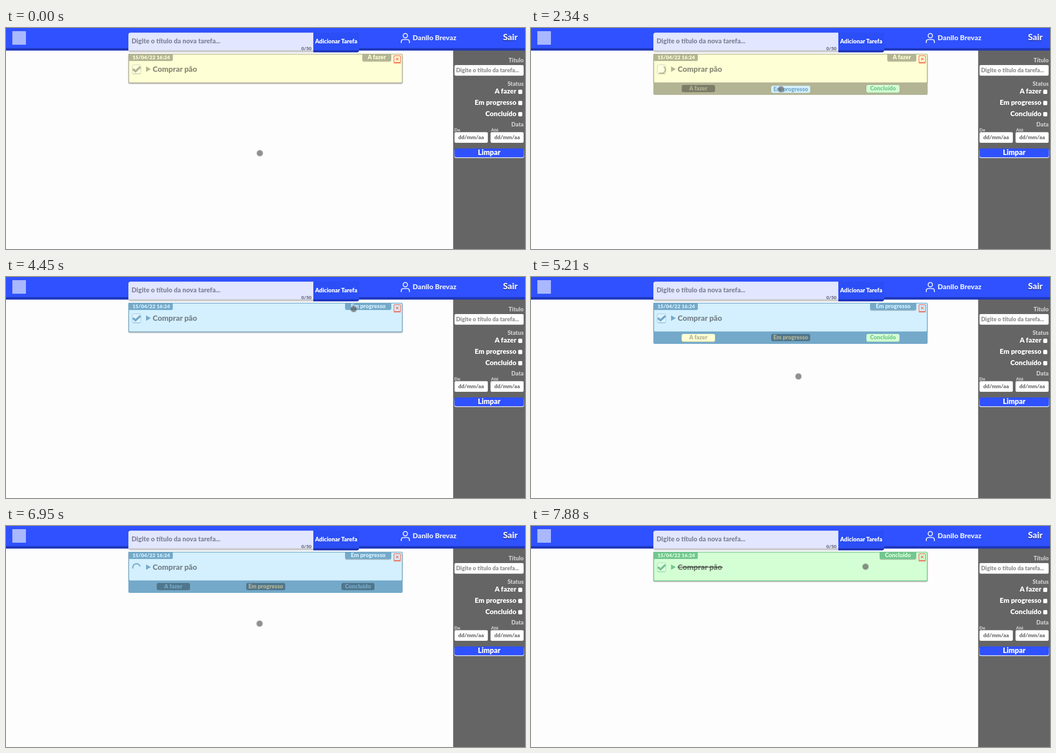
An HTML page that plays this animation: 1145 px wide and 489 px high, repeating every 8 s.

```html
<!DOCTYPE html>
<html lang="pt-BR">
<head>
<meta charset="utf-8">
<title>Lista de tarefas</title>
<style>
  :root {
    --yellow: #feffd4; --olive: #b2b494;
    --sky: #d4f0ff; --steel: #74a9c9;
    --mint: #d4ffd4; --leaf: #74c690;
    --dark: rgba(0, 0, 0, .3);
    --blue: #2f51ff; --navy: #2038bc;
  }
  html, body { margin: 0; width: 100%; height: 100%; overflow: hidden; background: #fdfdfd; }
  svg { display: block; width: 100vw; height: 100vh; }
  text { font: 900 12.6px Lato, "Open Sans", sans-serif; }
  .mid { text-anchor: middle; }
  .end { text-anchor: end; }
  .tiny { font-size: 10.2px; }
  .date { font-size: 11.9px; }
  .option { font-size: 15.1px; }

  .task, .drawer, .row, .btn, .badge, .lift, .box, .tick, .spinner, .strike, .title, .cursor {
    animation: 8s step-end infinite;
  }

  /* Card colours */
  .task { animation-name: theme; }
  .accent { fill: var(--accent); }
  .paper { fill: var(--bg); }
  .shadow { filter: blur(1.2px); opacity: .35; }
  @keyframes theme {
    0% { --accent: var(--olive); --tab: var(--olive); --bg: var(--yellow); }
    45.25% { --accent: var(--steel); --tab: var(--steel); --bg: var(--sky); }
    88.375% { --accent: #75b6a8; --tab: var(--leaf); --bg: #d4f6e5; }
    89.875%, 100% { --accent: var(--leaf); --tab: var(--leaf); --bg: var(--mint); }
  }

  /* Status drawer */
  .drawer { animation-name: drawer; }
  .row { animation-name: row; }
  @keyframes drawer {
    0%, 45.25%, 89.875%, 100% { clip-path: inset(0 0 33px 0); }
    16%, 58.625% { clip-path: inset(0 0 8px 0 round 3px); }
    17.625%, 60.25% { clip-path: inset(0 0 0 0 round 3px); }
    88.375% { clip-path: inset(0 0 19.5px 0 round 3px); }
  }
  @keyframes row {
    0%, 45.25%, 88.375%, 100% { transform: translateY(-2px); }
    17.625%, 60.25% { transform: none; }
  }
  .edge { fill: var(--edge); }
  .face { fill: var(--face); }
  .btn text { fill: var(--ink); }
  .todo { animation-name: todo; }
  .doing { animation-name: doing; }
  .done { animation-name: done; }
  @keyframes todo {
    0%, 82.25%, 100% { --face: var(--dark); --ink: var(--accent); --edge: transparent; }
    45.25% { --face: var(--yellow); --ink: var(--olive); --edge: #ece6a8; }
    88.375% { --face: #a9bea4; --ink: var(--accent); --edge: transparent; }
  }
  @keyframes doing {
    0% { --face: var(--sky); --ink: var(--steel); --edge: #b4dcf0; transform: none; }
    27.75% { --face: var(--sky); --ink: var(--steel); --edge: transparent; transform: translateY(1.5px); }
    31.125% { --face: var(--dark); --ink: var(--accent); --edge: transparent; transform: none; }
    88.375%, 100% { --face: #8fbfba; --ink: var(--accent); --edge: transparent; transform: none; }
  }
  @keyframes done {
    0%, 45.25% { --face: var(--mint); --ink: var(--leaf); --edge: #aee8b4; transform: none; }
    33%, 82.25%, 100% { --face: var(--dark); --ink: var(--accent); --edge: transparent; transform: none; }
    74.625% { --face: var(--mint); --ink: var(--leaf); --edge: transparent; transform: translateY(1.5px); }
  }

  /* Status badge */
  .badge text { fill: var(--bg); }
  .is-todo { animation-name: is-todo; }
  .is-doing { animation-name: is-doing; }
  .is-done { animation-name: is-done; }
  .lift { animation-name: lift; }
  @keyframes is-todo { 0% { opacity: 1; } 45.25%, 100% { opacity: 0; } }
  @keyframes is-doing { 0%, 88.375%, 100% { opacity: 0; } 45.25% { opacity: 1; } }
  @keyframes is-done { 0% { opacity: 0; } 88.375%, 100% { opacity: 1; } }
  @keyframes lift { 0%, 65.125%, 100% { opacity: .2; } 55.625% { opacity: 0; } }

  /* Checkbox and spinner */
  .box { animation-name: box; }
  .tick { animation-name: tick; }
  .spinner { animation-name: busy; }
  .arc { transform-origin: 288px 92px; animation: turn 1s -.51s linear infinite; }
  @keyframes box { 0%, 45.25%, 88.375%, 100% { opacity: 1; } 31.125%, 82.25% { opacity: 0; } }
  @keyframes tick { 0%, 45.25%, 88.375%, 100% { opacity: 1; } 29.25%, 80.75% { opacity: 0; } }
  @keyframes busy { 0%, 45.25%, 88.375%, 100% { opacity: 0; } 29.25%, 80.75% { opacity: 1; } }
  @keyframes turn { to { transform: rotate(360deg); } }

  .title { animation-name: title; }
  .strike { animation-name: strike; }
  @keyframes title { 0% { opacity: .5; } 88.375%, 100% { opacity: .58; } }
  @keyframes strike { 0% { opacity: 0; } 88.375%, 100% { opacity: .7; } }

  /* Pointer */
  .cursor { animation-name: pointer; }
  @keyframes pointer {
    0% { transform: translate(560px, 277px); }
    3.125% { transform: translate(525px, 240px); }
    4.625% { transform: translate(390px, 140px); }
    6.125% { transform: translate(305.5px, 86.5px); }
    8% { transform: translate(301.5px, 84.5px); }
    9.875% { transform: translate(288.5px, 89.5px); }
    19.125% { transform: translate(315px, 118px); }
    20.625% { transform: translate(408.5px, 165.5px); }
    22.375% { transform: translate(535.5px, 177.5px); }
    24.125% { transform: translate(549.5px, 143.5px); }
    25.875% { transform: translate(551.5px, 135.5px); }
    31.125% { transform: translate(551.5px, 171px); }
    33% { transform: translate(551.5px, 196px); }
    34.75% { transform: translate(551.5px, 200px); }
    43.375% { transform: translate(557px, 200px); }
    50.625% { transform: translate(625px, 178px); }
    52.125% { transform: translate(733px, 131px); }
    54% { transform: translate(765px, 84px); }
    55.625% { transform: translate(767px, 71px); }
    61.75% { transform: translate(755px, 110px); }
    63.25% { transform: translate(690px, 188px); }
    65.125% { transform: translate(590px, 220px); }
    66.625% { transform: translate(551px, 227px); }
    70.125% { transform: translate(558px, 215px); }
    71.625% { transform: translate(620px, 180px); }
    73.125% { transform: translate(702px, 148px); }
    74.625% { transform: translate(752px, 134px); }
    76.125% { transform: translate(758px, 133px); }
    79.25% { transform: translate(733px, 151px); }
    80.75% { transform: translate(640px, 190px); }
    82.25% { transform: translate(576px, 212px); }
    83.75% { transform: translate(559.5px, 216px); }
    96.5% { transform: translate(663.5px, 172.5px); }
    98.5%, 100% { transform: translate(738px, 90px); }
  }
</style>
</head>
<body>
<svg viewBox="0 0 1145 489" preserveAspectRatio="none">
  <!-- Header -->
  <rect width="1145" height="50" fill="var(--navy)"/>
  <rect width="1145" height="44.5" fill="var(--blue)"/>
  <rect x="14" y="7" width="30" height="30" fill="#a9b8ff"/>
  <path d="M678 10h96q5 0 5 5v34q0 5-5 5h-96z" fill="var(--navy)"/>
  <path d="M678 10h96q5 0 5 5v34h-101z" fill="#2b4ef6"/>
  <path d="M275 10.500h403v43.500h-403q-5 0-5-5v-33.500q0-5 5-5z" fill="#cdcdd0"/>
  <path d="M275 10.500h403v38.500h-408v-33.500q0-5 5-5z" fill="#e2e6ff"/>
  <text x="277" y="34" fill="#84879c" style="font-size:14.4px">Digite o título da nova tarefa...</text>
  <text class="end tiny" x="674" y="48.500" fill="#6a6c7c">0/50</text>
  <text class="mid" x="728.500" y="33.500" fill="#fff" style="font-size:12.7px">Adicionar Tarefa</text>
  <g fill="none" stroke="#e2e7ff" stroke-width="2.200" stroke-linecap="round">
    <circle cx="881" cy="17" r="4.800"/>
    <path d="M872 32.500v-2q0-5 5-5h8q5 0 5 5v2"/>
  </g>
  <text x="897" y="27.300" fill="#dfe5ff" style="font-size:15.5px">Danilo Brevaz</text>
  <g class="mid">
    <text x="1112.500" y="28.600" fill="#1c2f98" style="font-size:18.8px">Sair</text>
    <text x="1112.500" y="27.400" fill="#e6eaff" style="font-size:18.8px">Sair</text>
  </g>

  <!-- Filters -->
  <rect x="986.500" y="50" width="158.500" height="439" fill="#656565"/>
  <g fill="#c9c9c9">
    <text class="end" x="1142" y="75.500">Título</text>
    <text class="end" x="1142" y="128">Status</text>
    <text class="end" x="1142" y="218">Data</text>
    <text class="tiny" x="989" y="229">De</text>
    <text class="tiny" x="1070" y="229">Até</text>
  </g>
  <g fill="#fff">
    <rect x="989.500" y="82" width="152.500" height="23.500" rx="3"/>
    <rect x="1130" y="136.500" width="9" height="9.500" rx="2"/>
    <rect x="1130" y="161.300" width="9" height="9.500" rx="2"/>
    <rect x="1130" y="186" width="9" height="9.500" rx="2"/>
    <rect x="989.500" y="230.500" width="73.500" height="23.500" rx="3"/>
    <rect x="1069" y="230.500" width="73" height="23.500" rx="3"/>
    <text class="end option" x="1126" y="145.300">A fazer</text>
    <text class="end option" x="1126" y="170">Em progresso</text>
    <text class="end option" x="1126" y="194.700">Concluído</text>
  </g>
  <text x="993" y="98" fill="#909090" style="font-size:12.4px">Digite o título da tarefa...</text>
  <text class="mid date" x="1026" y="246" fill="#707070">dd/mm/aa</text>
  <text class="mid date" x="1105.500" y="246" fill="#707070">dd/mm/aa</text>
  <rect x="989" y="268" width="154" height="19.700" rx="4" fill="#dfe3f6"/>
  <rect x="989.500" y="266.500" width="153" height="19.500" rx="4" fill="var(--blue)"/>
  <text class="mid" x="1066" y="281" fill="#fff" style="font-size:16px">Limpar</text>

  <!-- Task -->
  <g class="task">
    <rect class="shadow" x="270" y="59" width="605" height="64.500" rx="3"/>
    <g class="drawer">
      <rect class="accent" x="270" y="115" width="605" height="33"/>
      <g class="row">
        <g class="btn todo">
          <rect class="edge" x="332.500" y="128" width="73.500" height="15.500" rx="4"/>
          <rect class="face" x="332.500" y="126" width="73.500" height="16" rx="4"/>
          <text class="mid" x="369" y="138">A fazer</text>
        </g>
        <g class="btn doing">
          <rect class="edge" x="530" y="128" width="86" height="15.500" rx="4"/>
          <rect class="face" x="530" y="126" width="86" height="16" rx="4"/>
          <text class="mid" x="573" y="138">Em progresso</text>
        </g>
        <g class="btn done">
          <rect class="edge" x="740" y="128" width="73" height="15.500" rx="4"/>
          <rect class="face" x="740" y="126" width="73" height="16" rx="4"/>
          <text class="mid" x="776.500" y="138">Concluído</text>
        </g>
      </g>
    </g>
    <rect class="paper" x="270.800" y="57.800" width="603.400" height="63.400" rx="2.500" stroke="var(--accent)" stroke-width="1.600"/>
    <path d="M270 57h98v13q0 3-3 3h-95z" fill="var(--tab)"/>
    <text class="paper" x="279" y="69" style="font-size:11.4px">15/04/22 16:24</text>

    <g class="badge is-todo">
      <path class="lift" d="M786 60h64v11q0 4-4 4h-56q-4 0-4-4z"/>
      <path class="accent" d="M786 57h64v12q0 4-4 4h-56q-4 0-4-4z"/>
      <text class="mid" x="818" y="69">A fazer</text>
    </g>
    <g class="badge is-doing">
      <path class="lift" d="M748 60h102v11q0 4-4 4h-94q-4 0-4-4z"/>
      <path class="accent" d="M748 57h102v12q0 4-4 4h-94q-4 0-4-4z"/>
      <text class="mid" x="799" y="69">Em progresso</text>
    </g>
    <g class="badge is-done">
      <path class="lift" d="M769 60h81v11q0 4-4 4h-73q-4 0-4-4z"/>
      <path class="accent" d="M769 57h81v12q0 4-4 4h-73q-4 0-4-4z"/>
      <text class="mid" x="809.500" y="69">Concluído</text>
    </g>

    <g fill="none" stroke="#f4553f" opacity=".75">
      <rect x="855.900" y="61.400" width="14.400" height="14.600" rx="1.500" stroke-width="1.600"/>
      <path d="M855.500 77.200h15.200" stroke-width="2.400"/>
      <path d="M860.300 65.800l5.600 5.600m0-5.600l-5.600 5.600" stroke-width="1.700"/>
    </g>

    <g class="box" fill="none" stroke="var(--tab)">
      <rect x="278.500" y="81.500" width="19" height="20" rx="3" fill="#fff" fill-opacity=".25" stroke-opacity=".65"/>
      <path d="M280 101.300h16" stroke-width="1.600" stroke-opacity=".6"/>
    </g>
    <path class="tick" d="M280 90.800l5.700 5.200 10.800-10" fill="none" stroke="var(--tab)" stroke-width="4.600"/>
    <g class="spinner">
      <path class="arc" d="M279.700 92.500a8.300 8.300 0 0 0 16.600-.500" fill="none" stroke="var(--accent)" stroke-width="2.600"/>
    </g>
    <path class="accent" d="M309 85l10.500 6-10.500 6z"/>
    <text class="title" x="323.500" y="96.800" fill="#222" style="font-size:16.9px">Comprar pão</text>
    <path class="strike" d="M323.500 91.200h99.500" stroke="#222" stroke-width="1.800"/>
  </g>

  <g class="cursor">
    <circle r="7.600" fill="#777" opacity=".4"/>
    <circle r="6.200" fill="#444" opacity=".42"/>
  </g>
</svg>
</body>
</html>
```
